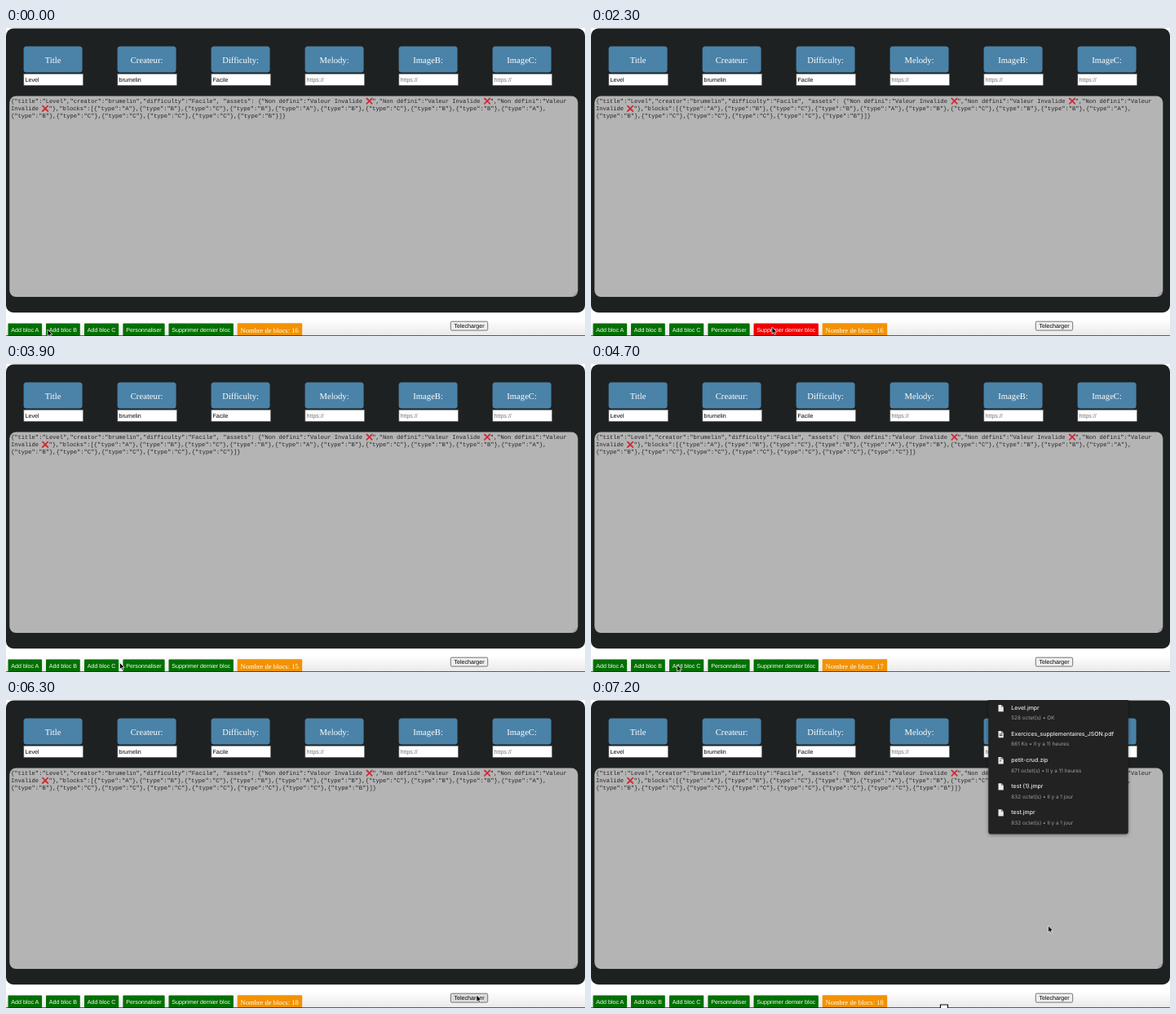
Write an HTML page that moves like this. It is 710 px wide and 378 px high and loops after 7.3 s.

```html
<!DOCTYPE html>
<html lang="fr">
<head>
<meta charset="utf-8">
<title>Level editor</title>
<style>
html, body { margin: 0; width: 100%; height: 100%; overflow: hidden; background: #fff; }
svg { display: block; width: 710px; height: 378px; }
text { white-space: pre; text-rendering: geometricPrecision; }
.sans { font: 7.11px "Liberation Sans", Arial, sans-serif; }
.mono { font: 7.11px "Liberation Mono", "Courier New", monospace; fill: #222; }
.label { font: 10.67px "Liberation Serif", Times, serif; fill: #fff; text-anchor: middle; }
.count { font: 8.53px "Liberation Serif", Times, serif; fill: #fff; }
.file { font: 500 6.93px Inter, sans-serif; fill: #e8eaed; }
.info { font: 6.4px Inter, sans-serif; fill: #9aa0a6; }
</style>
</head>
<body>
<svg viewBox="0 0 710 378">
  <defs>
    <linearGradient id="fade" x2="0" y2="1">
      <stop offset=".3" stop-color="#fff"/><stop offset="1" stop-color="#e9e9e9"/>
    </linearGradient>
    <filter id="shadow"><feDropShadow dx="0" dy="1" stdDeviation="2" flood-opacity=".4"/></filter>
  </defs>
  <rect y="349" width="710" height="29" fill="url(#fade)"/>
  <rect y=".5" width="710" height="348.7" rx="9" fill="#1e2121"/>
  <g id="fields"></g>
  <rect x="4.3" y="83.5" width="697" height="246.5" rx="8" fill="#b4b4b4"/>
  <path d="M695.5 328.5l5-5M698.3 328.5l2.2-2.2" stroke="#777" stroke-width=".6"/>
  <g id="json"></g>
  <g id="buttons"></g>
  <rect x="283.7" y="362.3" width="79.5" height="15.7" rx="1" fill="#f39200"/>
  <text id="count" class="count" x="287.5" y="374.2"></text>
  <rect y="377.3" width="710" height=".7" fill="#222"/>
  <rect id="save" x="545.3" y="360.2" width="45.4" height="10.9" rx="1.6" stroke="#555" stroke-width=".8"/>
  <text class="sans" x="568" y="368.2" text-anchor="middle">Telecharger</text>
  <g id="popup"></g>
  <path id="drop" d="M428.5 378V374H437.5V378" fill="#fff" stroke="#111" stroke-width="1.2"/>
  <path id="cursor" d="M0 0V8.3L1.9 6.6 3.1 9.3 4.5 8.7 3.3 6.1H5.9Z" fill="#000" stroke="#fff" stroke-width=".7"/>
</svg>
<script>
const $ = id => document.getElementById(id);
const text = (cls, x, y, s, extra = '') => `<text class="${cls}" x="${x}" y="${y}" ${extra}>${s}</text>`;
const box = (x, y, w, h, rx, fill, extra = '') =>
  `<rect x="${x}" y="${y}" width="${w}" height="${h}" rx="${rx}" fill="${fill}" ${extra}/>`;

// Form fields
$('fields').innerHTML = [
  ['Title', 'Level'], ['Createur:', 'brumelin'], ['Difficulty:', 'Facile'],
  ['Melody:'], ['ImageB:'], ['ImageC:']
].map(([label, value], i) => {
  const x = 21.6 + 115 * i;
  return box(x, 22.4, 72, 32.2, 3.5, '#4a82a8') + text('label', x + 36, 43, label) +
    box(x + .3, 56.3, 72.5, 14, 0, '#fff', 'stroke="#777" stroke-width=".6"') +
    text('sans', x + 1.9, 65.7, value || 'https://', value ? '' : 'fill="#757575"');
}).join('');

// JSON output
const blocks = s => [...s].map(c => `{"type":"${c}"}`).join();
const cross = (x, y) =>
  `<path d="M${x + 1} ${y - 5.6}l6.4 6.4m0-6.4l-6.4 6.4" stroke="#cf2e3a" stroke-width="1.8" stroke-linecap="round"/>`;
const asset = '"Non défini":"Valeur ';
const rows = [92.1, 101.2, 110.2];
$('json').innerHTML =
  text('mono', 6, rows[0], `{"title":"Level","creator":"brumelin","difficulty":"Facile", "assets": {${asset}Invalide `) +
  cross(441.4, rows[0]) + text('mono', 449.2, rows[0], `",${asset}Invalide `) +
  cross(585.9, rows[0]) + text('mono', 593.7, rows[0], `",${asset}`) +
  text('mono', 6, rows[1], 'Invalide ') + cross(43.9, rows[1]) +
  text('mono', 52.4, rows[1], `"},"blocks":[${blocks('ABCBABCBBA')},`) +
  text('mono', 6, rows[2], '', 'id="tail"');

// Bottom buttons
$('buttons').innerHTML = [
  [2.5, 41.6, 'Add bloc A'], [49, 41.8, 'Add bloc B'], [96, 42.2, 'Add bloc C'],
  [143.4, 51.2, 'Personnaliser'], [199.5, 79.4, 'Supprimer dernier bloc']
].map(([x, w, s]) => box(x, 362.4, w, 15.6, 1, '#007000') +
  text('sans', x + w / 2, 372.7, s, 'fill="#fff" text-anchor="middle"')).join('');
const remove = $('buttons').querySelector('rect:last-of-type');

// Download list; later entries sit lower while the progress bar shows
const icon = y => `<path d="M499.5 ${y - 4}h4l2.3 2.3v6h-6.3z" fill="#e8eaed"/>
  <path d="M503.5 ${y - 4}v2.3h2.3" fill="none" stroke="#202124" stroke-width=".5"/>`;
const marks = [, 'M500.8 42h3.7m-3.7 1.6h3.7', 'M502 71v1m0 1v2.6'];
const entries = [
  ['Level.jmpr', '528 octet(s) • OK'],
  ['Exercices_supplementaires_JSON.pdf', '661 Ko • Il y a 11 heures'],
  ['petit-crud.zip', '671 octet(s) • Il y a 11 heures'],
  ['test (1).jmpr', '832 octet(s) • Il y a 1 jour'],
  ['test.jmpr', '832 octet(s) • Il y a 1 jour']
].map(([name, info], i) => {
  const y = 9.5 + 32.1 * i;
  return icon(y + .4) + (marks[i] ? `<path d="${marks[i]}" stroke="#202124" stroke-width=".8"/>` : '') +
    text('file', 515.3, y + 2.3, name) + text('info', 515.3, y + 14.8, info);
});
$('popup').innerHTML = box(487.3, -10, 171.5, 174.5, 3, '#202124', 'id="panel" filter="url(#shadow)"') +
  entries[0] + box(496, 31.3, 154, 1.8, .9, '#819fe4', 'id="bar"') +
  `<g id="older">${entries.slice(1).join('')}</g>`;

// Cursor path: time, x, y
const path = [
  [0, 51, 370], [400, 33, 370], [500, 33, 370], [900, 45, 369], [1000, 45, 369],
  [1400, 260, 364.5], [1800, 260, 364.5], [2300, 222, 367], [2900, 222, 367],
  [3200, 190.8, 362], [3300, 185, 362], [3400, 185, 362], [4200, 112, 369],
  [4600, 112, 369], [4700, 105.5, 369], [4900, 87, 369], [5300, 87, 369],
  [5600, 340, 364], [5700, 340, 364], [6300, 577, 362], [6500, 569.5, 363.3],
  [6900, 569.5, 363.3], [7200, 560.7, 277]
];
// Blocks after the fixed ones, from each time on
const edits = [[0, 'B'], [600, 'BA'], [1900, 'B'], [2800, ''], [4400, 'C'], [4500, 'CC'], [5100, 'CCB']];

function cursorAt(t) {
  const i = path.findIndex(p => p[0] >= t);
  if (i < 1) return path[0].slice(1);
  const [t0, x0, y0] = path[i - 1], [t1, x1, y1] = path[i], k = (t - t0) / (t1 - t0);
  return [x0 + (x1 - x0) * k, y0 + (y1 - y0) * k];
}
const show = (id, on) => $(id).setAttribute('visibility', on ? 'inherit' : 'hidden');

function draw(now) {
  const t = Math.floor(now % 7300 / 100) * 100;
  const [x, y] = cursorAt(t);
  const added = edits.findLast(e => e[0] <= t)[1];
  $('cursor').setAttribute('transform', `translate(${x} ${y})`);
  $('tail').textContent = blocks('BCCCC' + added) + ']}';
  $('count').textContent = 'Nombre de blocs: ' + (15 + added.length);
  remove.setAttribute('fill', t >= 1300 && t < 3300 || t === 5500 ? '#f00000' : '#007000');

  const hover = x > 545 && x < 591 && y > 359;
  $('save').setAttribute('fill', t === 6600 ? '#f5f5f5' : hover ? '#dcdcdc' : '#efefef');

  const loading = t < 7100;
  show('popup', t >= 6900);
  show('bar', loading);
  $('panel').setAttribute('height', loading ? 178.3 : 174.5);
  $('older').setAttribute('transform', `translate(0 ${loading ? 5.8 : 0})`);
  show('drop', t === 7200);
}

const start = performance.now();
(function loop() {
  draw(performance.now() - start);
  requestAnimationFrame(loop);
})();
</script>
</body>
</html>
```
